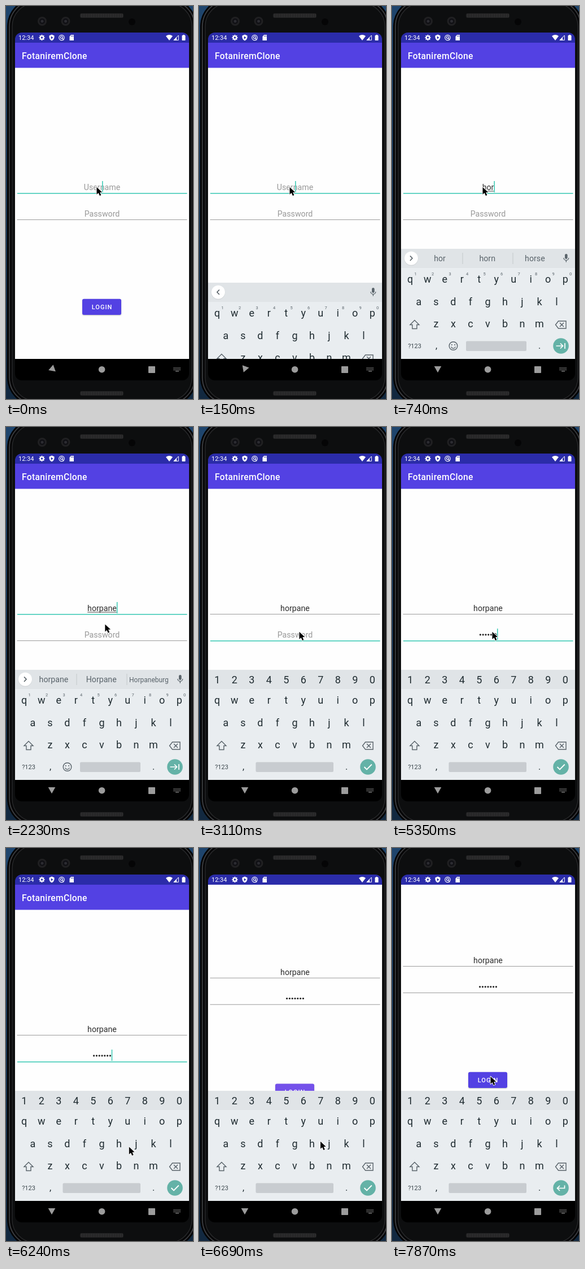
Recreate the animation shown at these times as an HTML page with a canvas. Size 331 by 696 pixels, loop 8 s.

```html
<!DOCTYPE html>
<html lang="en">
<head>
<meta charset="utf-8">
<title>Login</title>
<style>
html, body { margin: 0; width: 100%; height: 100%; overflow: hidden; background: #000; }
canvas { display: block; width: 331px; height: 696px; }
</style>
</head>
<body>
<canvas id="stage"></canvas>
<script>
const W = 331, H = 696, LOOP = 8000, STEP = 147, MID = 170;
const canvas = document.getElementById('stage');
const ratio = window.devicePixelRatio || 1;
canvas.width = W * ratio;
canvas.height = H * ratio;
const c = canvas.getContext('2d');

const FONT = 'Roboto, "Noto Sans", sans-serif';
const WHITE = '#fff', PURPLE = '#5341e3', STATUS = '#2b2ca9', TEAL = '#42cbb7';
const KEY = '#1f2b30', ICON = '#59636a', GRAY = '#9c9c9c';
const TITLE = 'FotaniremClone', NAME = 'horpane', PASS = 'savenor';

// bursts of typing: start time, keystrokes
const NAME_BURSTS = [[590, 2], [590, 1], [1330, 2], [1780, 2]];
const PASS_BURSTS = [[4310, 1], [4600, 2], [5050, 4]];
const T = { slide: 150, open: 290, tap: 2680, secret: 2820, move: 5800, pan: 6535, enter: 6970, press: 7260 };
// pointer tip: time, x, y
const PATH = [
  [1930, 160, 320], [2224, 175, 349], [2520, 177, 362], [5650, 177, 362],
  [6300, 236, 606], [6682, 214.5, 519], [7280, 174, 404]
];

const clamp = (v, lo, hi) => Math.min(hi, Math.max(lo, v));
const within = (t, a, b) => t >= a && t < b;
const typed = (bursts, t) => bursts.reduce(
  (sum, [start, n]) => sum + clamp(Math.floor((t - start) / STEP) + 1, 0, n), 0);

// the picture advances in short even steps while things move
function stepped(t) {
  const from = t >= T.move ? T.move : 1780;
  return t < from ? t : from + Math.floor((t - from) / STEP) * STEP;
}

function pointerAt(t) {
  const i = clamp(PATH.findIndex(p => p[0] > t), 1, PATH.length - 1);
  const last = t >= PATH[PATH.length - 1][0];
  const [t0, x0, y0] = PATH[last ? PATH.length - 2 : i - 1];
  const [t1, x1, y1] = PATH[last ? PATH.length - 1 : i];
  const k = clamp((t - t0) / (t1 - t0), 0, 1);
  return [x0 + (x1 - x0) * k, y0 + (y1 - y0) * k];
}

function rect(x, y, w, h, color) {
  c.fillStyle = color;
  c.fillRect(x, y, w, h);
}
function round(x, y, w, h, r, color) {
  c.beginPath();
  c.roundRect(x, y, w, h, r);
  c.fillStyle = color;
  c.fill();
}
function disc(x, y, r, color) {
  c.beginPath();
  c.arc(x, y, r, 0, Math.PI * 2);
  c.fillStyle = color;
  c.fill();
}
function arc(x, y, r, color, width, from = 0, to = Math.PI * 2) {
  c.beginPath();
  c.arc(x, y, r, from, to);
  c.strokeStyle = color;
  c.lineWidth = width;
  c.stroke();
}
function trace(points) {
  c.beginPath();
  for (let i = 0; i < points.length; i += 2) c.lineTo(points[i], points[i + 1]);
}
function poly(points, color) {
  trace(points);
  c.closePath();
  c.fillStyle = color;
  c.fill();
}
function line(points, color, width = 1.4, closed = false) {
  trace(points);
  if (closed) c.closePath();
  c.strokeStyle = color;
  c.lineWidth = width;
  c.stroke();
}
// full outline from its right half, given as offsets from the axis
function mirror(cx, half) {
  const right = [], left = [];
  for (let i = 0; i < half.length; i += 2) {
    right.push(cx + half[i], half[i + 1]);
    left.unshift(cx - half[i], half[i + 1]);
  }
  return right.concat(left);
}
// arrowhead with its tip at x, y; a positive dx points right
function head(x, y, dx, dy, color, width) {
  line([x - dx, y - dy, x, y, x - dx, y + dy], color, width);
}
function text(s, x, y, size, color, align = 'center', weight = 400, spacing = 0) {
  c.font = `${weight} ${size}px ${FONT}`;
  c.letterSpacing = spacing + 'px';
  c.textAlign = align;
  c.fillStyle = color;
  c.fillText(s, x, y);
}
function widthOf(s, size) {
  c.font = `400 ${size}px ${FONT}`;
  c.letterSpacing = '0px';
  return c.measureText(s).width;
}

function speaker(y) {
  round(131, y, 77, 8, 3, '#232324');
  for (let x = 133; x < 206; x += 3) rect(x, y + 1, 1, 6, '#363637');
}

// one of the nested outlines of the phone body
function shell(inset, fill, edge, width) {
  round(inset, inset - 16, 2 * (MID - inset), 726 - 2 * inset, 52 - inset, fill);
  c.strokeStyle = edge;
  c.lineWidth = width;
  c.stroke();
}

function phone() {
  const bg = c.createLinearGradient(0, 0, 0, H);
  bg.addColorStop(0, '#1f456d');
  bg.addColorStop(1, '#12283f');
  rect(0, 0, W, H, bg);
  shell(2.5, '#070708', '#000', 1);
  shell(6, '#070708', '#434447', 1.6);
  shell(11, '#0d0e0f', '#2c2d2f', 1.2);
  speaker(13);
  speaker(682);
  for (const x of [64, 105.5]) {
    disc(x, 27, 8, '#202022');
    disc(x, 27, 5, '#101014');
    disc(x, 27, 2.5, '#2b2b31');
  }
  disc(223, 28, 6, '#050506');
}

function statusBar() {
  const y = 56;
  rect(16, 47, 308, 18, STATUS);
  text('12:34', 22, 60, 11, WHITE, 'left');
  disc(63.5, y, 3.8, WHITE);
  for (let a = 0; a < Math.PI * 2; a += Math.PI / 4)
    disc(63.5 + 4.2 * Math.cos(a), y + 4.2 * Math.sin(a), 1.1, WHITE);
  disc(63.5, y, 1.7, STATUS);
  poly(mirror(81, [0, 50.5, 4.5, 52.5, 4.5, y, 3, 59.5, 0, 61.5]), WHITE);
  poly([79.7, 53.5, 83.5, y, 79.7, 58.5], STATUS);
  arc(98.5, y, 4.7, WHITE, 1.2);
  arc(98.5, y - 0.5, 2, WHITE, 1.1);
  line([100, 57, 102, 60.5], WHITE, 1.2);
  poly([112.5, 54, 115, 51, 120, 51, 120, 61, 112.5, 61], WHITE);
  for (let i = 0; i < 3; i++) rect(115 + i * 1.7, 52.3, 0.8, 2, STATUS);
  poly(mirror(289, [0, 51, 3, 51.5, 6, 53.2, 0, 61]), WHITE);
  line([297, 60.4, 305.3, 60.4, 305.3, 52], WHITE, 1, true);
  poly([296.5, 61, 302, 55, 302, 61], WHITE);
  round(311.5, 52, 6, 9, 0.8, WHITE);
  rect(313, 51, 3, 1.2, WHITE);
}

function caret(x, y) {
  rect(x - 0.8, y, 1.6, 20, TEAL);
}
function underline(y, active) {
  if (active) rect(20, y, 300.5, 1.6, TEAL);
  else rect(19.5, y, 301, 1, GRAY);
}

function nameField(t) {
  const s = NAME.slice(0, typed(NAME_BURSTS, t)), w = widthOf(s, 14.2);
  const active = t < T.tap;
  if (s) text(s, MID, 326, 14.2, '#2e2e2e');
  else text('Username', MID, 326, 14.2, '#999');
  if (s && active) rect(MID - w / 2, 327.5, w, 1, '#444');
  underline(331, active);
  const off = within(t, T.open, 590) || t >= 2500;
  if (active && !off) caret(MID + w / 2 + 0.8, 310);
}

function passField(t) {
  const n = typed(PASS_BURSTS, t), pitch = 4.8;
  const active = within(t, T.tap, T.pan);
  // the newest character stays readable for a moment
  const dots = n && t < T.move ? n - 1 : n;
  const shown = PASS.slice(dots, n);
  const w = dots * pitch + widthOf(shown, 14.2), left = MID - w / 2;
  if (!n) text('Password', MID, 373, 14.2, '#999');
  for (let i = 0; i < dots; i++) disc(left + (i + 0.5) * pitch, 367.8, 1.6, '#222');
  text(shown, left + dots * pitch, 373, 14.2, '#2e2e2e', 'left');
  underline(378, active);
  const blink = Math.floor((t - 2600) / 500) % 2 === 0;
  if (active && (blink || within(t, 4310, T.move))) caret(MID + w / 2 + 0.7, 357);
}

function page(t) {
  const k = clamp((t - T.pan) / 250, 0, 1);
  c.save();
  c.beginPath();
  c.rect(16, 65, 308, 560);
  c.clip();
  rect(16, 65, 308, 560, '#fefefe');
  c.translate(0, -122 * (1 - (1 - k) ** 2));
  rect(16, 65, 308, 44.5, PURPLE);
  text(TITLE, 28, 94, 15.7, WHITE, 'left', 500, 0.3);
  nameField(t);
  passField(t);
  c.save();
  c.shadowColor = 'rgba(0,0,0,.25)';
  c.shadowBlur = 2 * ratio;
  c.shadowOffsetY = ratio;
  round(135, 518.7, 69, 28.3, 3, within(t, T.pan, T.press) ? '#7451ea' : PURPLE);
  c.restore();
  text('LOGIN', MID, 537, 11, WHITE, 'center', 500, 1);
  c.restore();
}

function hints(s) {
  const pair = { ho: ['how', 'home'], hor: ['horn', 'horse'] }[s];
  const cap = s.charAt(0).toUpperCase() + s.slice(1);
  return [s, ...(pair || [cap, s === NAME ? cap + 'burg' : 'horns'])];
}

function suggestions(t) {
  const s = NAME.slice(0, typed(NAME_BURSTS, t));
  disc(34, 447.5, 12.3, 'rgba(0,0,0,.08)');
  disc(34, 446.8, 12, WHITE);
  const d = s ? 2 : -2;
  head(34 + d, 446.8, 2 * d, 4.2, '#4c565c', 1.5);
  if (s) hints(s).forEach((word, i) => {
    if (i) rect(35.5 + i * 89, 437, 1, 20, '#c2c7ca');
    text(word, 84.5 + i * 84.2, 452, word.length > 9 ? 12 : 14.2, ICON);
  });
  round(306, 439, 4.6, 9, 2.3, ICON);
  arc(308.3, 446, 4.4, ICON, 1.3, 0, Math.PI);
  rect(307.6, 450, 1.4, 3.6, ICON);
}

function actionKey(t) {
  disc(299, 602, 13.8, '#64b2a7');
  if (t < T.secret) {
    line([290.5, 602, 302, 602], WHITE, 1.7);
    head(302.5, 602, 4.5, 4.5, WHITE, 1.7);
    line([306, 597, 306, 607], WHITE, 1.7);
  } else if (t < T.enter) {
    line([292.5, 602, 297, 606.5, 305.8, 597.5], WHITE, 1.8);
  } else {
    line([305.5, 597.5, 305.5, 602.5, 292.5, 602.5], WHITE, 1.7);
    head(292.5, 602.5, -4.5, 4.5, WHITE, 1.7);
  }
}

function keyboard(t) {
  if (t < T.slide) return;
  const secret = t >= T.secret;
  c.save();
  c.beginPath();
  c.rect(16, 109, 308, 516);
  c.clip();
  c.translate(0, t < T.open ? 60 : 0);
  rect(16, 430, 308, 195, '#e9edf0');
  rect(16, 430, 308, 34, '#e0e4e7');

  const column = i => 32.2 + i * 30.5;
  const row = (keys, y, shift) =>
    [...keys].forEach((s, i) => text(s, column(i + shift), y, 18, KEY));
  if (secret) row('1234567890', 454, 0);
  else suggestions(t);
  ['qwertyuiop', 'asdfghjkl', 'zxcvbnm'].forEach((keys, r) =>
    row(keys, 490 + r * 39.5, r && r - 0.5));
  for (let i = 0; !secret && i < 10; i++)
    text((i + 1) % 10, column(i) + 9.5, 477, 7.5, ICON);

  line(mirror(40, [0, 556.5, 8, 564.5, 4, 564.5, 4, 571.5]), ICON, 1.4, true);
  line([289.5, 564.5, 294.5, 558, 308, 558, 308, 571, 294.5, 571], ICON, 1.4, true);
  line([297, 561, 304, 568], ICON);
  line([304, 561, 297, 568], ICON);

  text('?123', 40, 606, 11, '#3c474d');
  text(',', 78.5, 607, 16, KEY);
  text('.', 261, 607, 16, KEY);
  if (!secret) {
    arc(108.5, 602, 7.3, ICON, 1.4);
    arc(108.5, 602.5, 3.8, ICON, 1.3, 0.2, Math.PI - 0.2);
    for (const side of [-1, 1]) disc(108.5 + side * 2.7, 600, 1.1, ICON);
  }
  const left = secret ? 100.5 : 131;
  round(left, 593.5, 238 - left, 17.5, 2, '#c8ccd0');
  actionKey(t);
  c.restore();
}

function navBar(t) {
  rect(16, 625, 308, 38, '#000');
  c.save();
  c.translate(81, 643);
  c.rotate(-clamp(20 + Math.floor(t / STEP) * 50, 20, 90) * Math.PI / 180);
  poly([-6.2, 0, 5, -6.3, 5, 6.3], GRAY);
  c.restore();
  disc(169.6, 643.7, 5.8, GRAY);
  round(252, 638, 12, 12, 0.8, GRAY);
  for (let i = 0; i < 18; i++)
    rect(296.5 + i % 6 * 2.2, 640 + Math.floor(i / 6) * 2.1, 1.2, 1.1, GRAY);
  rect(300, 646.3, 6, 1.1, GRAY);
}

function pointer(t) {
  const [x, y] = pointerAt(t);
  c.save();
  c.translate(x + 0.5, y + 0.7);
  c.scale(0.9, 0.9);
  trace([0, 0, 0, 14.5, 3.5, 11.4, 6, 17, 8.7, 15.8, 6.3, 10.4, 10.8, 10.2]);
  c.closePath();
  c.lineJoin = 'round';
  c.strokeStyle = WHITE;
  c.lineWidth = 2;
  c.stroke();
  c.fillStyle = '#000';
  c.fill();
  c.restore();
}

function draw(now) {
  const t = now % LOOP, s = stepped(t);
  c.setTransform(ratio, 0, 0, ratio, 0, 0);
  phone();
  c.save();
  c.beginPath();
  c.roundRect(16, 47, 308, 616, 12);
  c.clip();
  page(t >= T.move ? s : t);
  statusBar();
  keyboard(t);
  navBar(t);
  c.restore();
  pointer(s);
}

let start = null;
function frame(now) {
  if (start === null) start = now;
  draw(now - start);
  requestAnimationFrame(frame);
}
draw(0);
requestAnimationFrame(frame);
</script>
</body>
</html>
```
